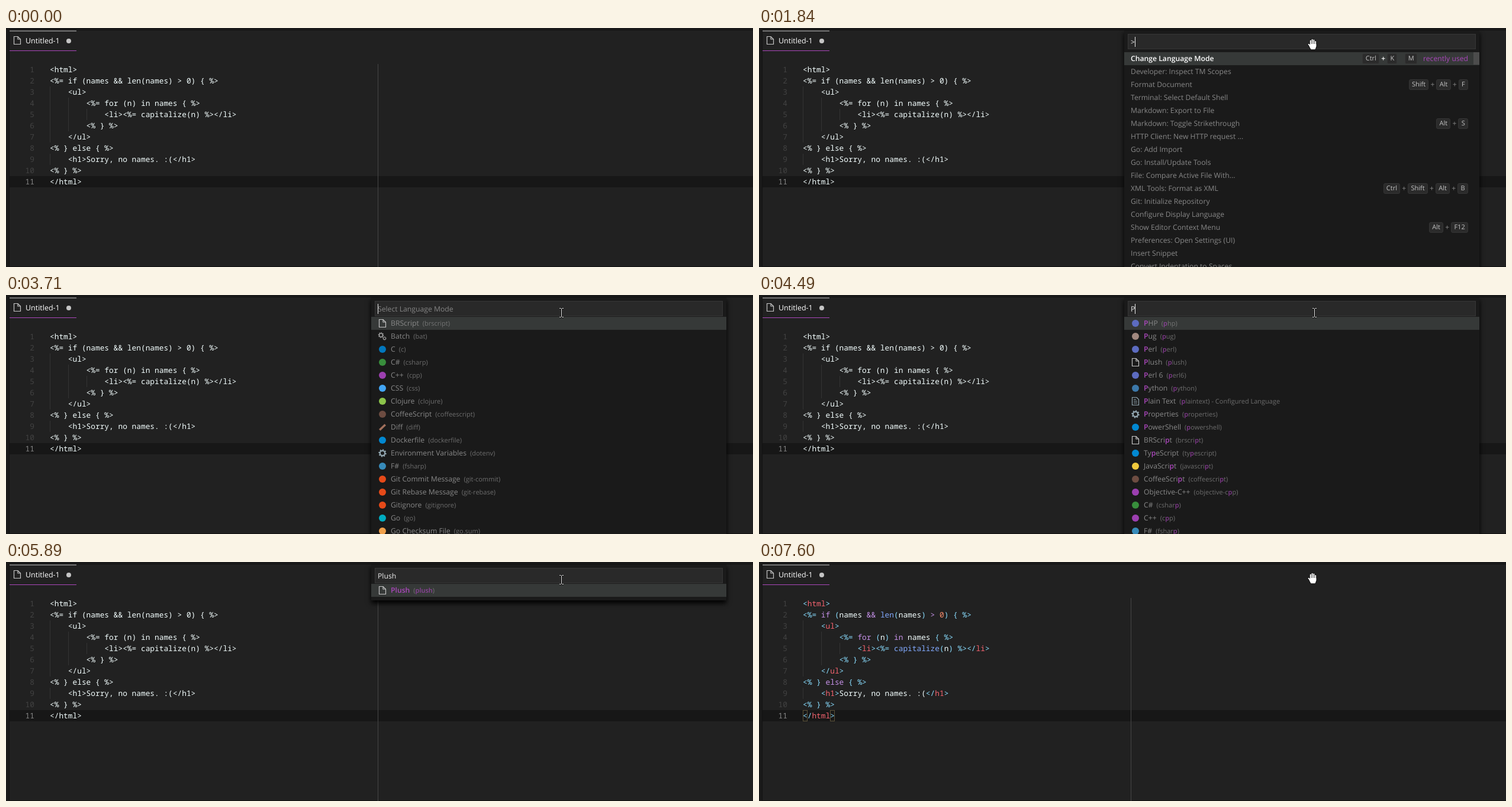
Recreate the animation shown at these times as an HTML page. Size 1262 px wide and 405 px high, loop 8000 ms.

```html
<!DOCTYPE html>
<html lang="en">
<head>
<meta charset="utf-8">
<title>Choosing a language mode</title>
<style>
html, body { margin: 0; width: 100%; height: 100%; overflow: hidden; background: #1a1a1a; }
#stage {
  position: relative; width: 1262px; height: 405px; overflow: hidden; background: #1a1a1a;
  font: 12.2px "Open Sans", "Noto Sans", sans-serif; text-rendering: geometricPrecision; white-space: pre;
}
#stage div, #stage svg { position: absolute; box-sizing: border-box; }
#editor { left: 5px; top: 3px; width: 1257px; height: 402px; background: #212121; border: 1px solid #121212; border-width: 1px 0 1px 1px; }
#tab { left: 6px; top: 4px; width: 113px; height: 35px; border-top: 2px solid #777; border-bottom: 1px solid #ab47bc; }
#title { left: 33px; top: 12px; line-height: 20px; font-size: 12.5px; font-weight: 500; color: #fff; }
#dot { left: 102px; top: 18px; width: 8px; height: 8px; border-radius: 50%; background: #c5c5c5; }
#band { left: 6px; top: 251px; width: 1256px; height: 19px; background: #171717; }
#ruler { left: 628px; top: 61px; width: 1px; height: 344px; background: #474747; }
.guide { width: 1px; background: #333; }
.code { left: 74px; top: 61px; font: 500 12.83px/19px "Noto Sans Mono", "DejaVu Sans Mono", monospace; color: #f4ffff; }
#nums { left: 18px; width: 30px; text-align: right; font-weight: 400; color: #424242; }
#nums b { font-weight: 400; color: #858585; }
.pair { width: 8px; height: 19px; border: 1px solid #5c5238; }
#caret { left: 127px; top: 251px; width: 2px; height: 19px; background: #fc0; }
.op { color: #89ddff; } .tag { color: #f4636f; } .key { color: #c792ea; } .fn { color: #82aaff; } .num { color: #f78c6c; }

#panels { left: 0; top: 0; }
.panel { left: 617px; top: 4px; width: 600px; background: #1a1a1a; box-shadow: 0 5px 8px #000; color: #888; }
.field { left: 6px; top: 6px; width: 588px; height: 26px; padding-left: 4px; line-height: 25px; background: #292929; border: 1px solid #373737; color: #f0f0f0; }
.field i { display: inline-block; width: 1px; height: 17px; margin-right: -1px; vertical-align: -4px; background: #eee; }
.field em { font-style: normal; color: #858585; }
.row { left: 0; width: 600px; height: 22px; line-height: 22px; padding-left: 11px; }
.modes .row { padding-left: 33px; }
.row.on { background: #363938; }
.commands .on { color: #fff; font-weight: 600; }
.row small { font-size: 11px; margin-left: 6px; opacity: .75; }
.row b { font-weight: 600; color: #ab47bc; }
.row svg { left: 11px; top: 3px; }
.keys { right: 19px; top: 0; display: flex; align-items: center; height: 22px; }
.keys kbd { font: 11px/16px "Open Sans", "Noto Sans", sans-serif; padding: 0 4.3px; border: 1px solid #353535; border-radius: 3px; background: #2b2b2b; color: #c4c4c4; }
.keys span { width: 13px; text-align: center; }
.keys u { margin-left: 10px; font-weight: 400; color: #ab47bc; text-decoration: none; }
.bar { right: 0; top: 37px; width: 10px; height: 21px; background: #4c4c4c; }
</style>
</head>
<body>
<div id="stage">
  <div id="editor"></div>
  <div id="tab"></div>
  <svg style="left:11px;top:13px" width="16" height="16" id="file"></svg>
  <div id="title">Untitled-1</div>
  <div id="dot"></div>
  <div id="band"></div>
  <div class="code" id="nums"></div>
  <div class="code" id="plain"></div>
  <div class="code" id="colored"></div>
  <div id="guides"></div>
  <div id="ruler"></div>
  <div id="caret"></div>
  <div id="panels"></div>
  <svg id="hand" style="left:924px;top:16px" width="22" height="23" fill="none" stroke-linecap="round" stroke-linejoin="round">
    <g id="palm"><path d="M7.8 12V5.5M10.6 11V3.8M13.4 11V4.4M16.2 12V7M8 15 4.6 11.8"/><path d="M8 12H16.5V15L15 19.2H9L6.5 14.5Z"/></g>
  </svg>
  <svg id="beam" style="left:933px;top:21px" width="12" height="18" fill="none">
    <path d="M2 1.5H4.5L5.5 2.5 6.5 1.5H9M5.5 2.5V15.5M2 16.5H4.5L5.5 15.5 6.5 16.5H9" stroke="#111" stroke-width="3"/>
    <path d="M2 1.5H4.5L5.5 2.5 6.5 1.5H9M5.5 2.5V15.5M2 16.5H4.5L5.5 15.5 6.5 16.5H9" stroke="#eee"/>
  </svg>
</div>
<script>
const LOOP = 8000;
const $ = id => document.getElementById(id);
const esc = s => s.replace(/&/g, '&amp;').replace(/</g, '&lt;').replace(/>/g, '&gt;');

function add(parent, cls, html = '', css = '') {
  const el = document.createElement('div');
  el.className = cls;
  el.innerHTML = html;
  el.style.cssText = css;
  parent.append(el);
  return el;
}

// Each entry is switched on and off alternately at its times (ms).
const flips = [];
const flip = (el, ...times) => flips.push([el, times]);

// Editor
const lines = `<html>
<%= if (names && len(names) > 0) { %>
    <ul>
        <%= for (n) in names { %>
            <li><%= capitalize(n) %></li>
        <% } %>
    </ul>
<% } else { %>
    <h1>Sorry, no names. :(</h1>
<% } %>
</html>`.split('\n');

const rules = [
  ['', /Sorry.*\(/], ['key', /&&| > |\b(?:if|for|in|else)\b/], ['tag', /(?<=<\/?)\w+/],
  ['fn', /\w+(?=\()/], ['num', /\d+/], ['op', /<%=?|%>|<\/?|[>(){}]/]
];
const anyRule = new RegExp(rules.map(r => `(${r[1].source})`).join('|'), 'g');

function paint(line) {
  let out = '', at = 0;
  for (const m of line.matchAll(anyRule)) {
    const rule = rules[m.slice(1).findIndex(g => g !== undefined)];
    out += esc(line.slice(at, m.index)) + `<span class="${rule[0]}">${esc(m[0])}</span>`;
    at = m.index + m[0].length;
  }
  return out + esc(line.slice(at));
}

$('nums').innerHTML = lines.map((_, i) => i < 10 ? i + 1 : `<b>${i + 1}</b>`).join('\n');
$('plain').textContent = lines.join('\n');
$('colored').innerHTML = lines.map(paint).join('\n');
for (const [x, first, count] of [[0, 3, 5], [0, 9, 1], [31, 4, 3], [62, 5, 1]])
  add($('guides'), 'guide', '', `left:${74 + x}px;top:${42 + first * 19}px;height:${count * 19}px`);
$('guides').style.cssText = 'left:0;top:0';
for (const x of [0, 46]) add($('colored'), 'pair', '', `left:${x}px;top:190px`);

// Icons
const page = '<path d="M2.5 1.5H9L13.5 6V14.5H2.5ZM9 1.5V6H13.5" fill="none" stroke="#c5c5c5" stroke-width="1.2"/>';
const gear = (x, y, r, c) => `<g fill="none" stroke="${c}"><circle cx="${x}" cy="${y}" r="${r}" stroke-width="${r * .55}"/>` +
  `<circle cx="${x}" cy="${y}" r="${r * 1.35}" stroke-width="${r * .5}" pathLength="16" stroke-dasharray="1"/></g>`;
const icons = {
  page,
  text: '<path d="M2.5 1.5H10L13.5 5V14.5H2.5ZM5 5H9M5 8H11M5 11H11" fill="none" stroke="#90a4ae" stroke-width="1.2"/>',
  gears: gear(5.5, 6, 3, '#9a9a9a') + gear(11.5, 11.5, 2, '#9a9a9a'),
  gear: gear(8, 8, 4.2, '#90a4ae'),
  diff: '<path d="M2 11.5 11.5 2.5 14 5 4.5 14Z" fill="#a1705c"/>'
};
const dot = c => `<circle cx="8" cy="8" r="6" fill="${c}"/>`;
const svg = name => `<svg width="16" height="16">${icons[name] || dot(name)}</svg>`;
$('file').innerHTML = page;

// Quick pick panels
const commands = `Change Language Mode|Ctrl+K M
Developer: Inspect TM Scopes
Format Document|Shift+Alt+F
Terminal: Select Default Shell
Markdown: Export to File
Markdown: Toggle Strikethrough|Alt+S
HTTP Client: New HTTP request ...
Go: Add Import
Go: Install/Update Tools
File: Compare Active File With...
XML Tools: Format as XML|Ctrl+Shift+Alt+B
Git: Initialize Repository
Configure Display Language
Show Editor Context Menu|Alt+F12
Preferences: Open Settings (UI)
Insert Snippet
Convert Indentation to Spaces`.split('\n');

const modes = `BRScript|brscript|page
Batch|bat|gears
C|c|#0277bd
C#|csharp|#388e3c
C++|cpp|#9c3fb0
CSS|css|#42a5f5
Clojure|clojure|#8bc34a
CoffeeScript|coffeescript|#6d4c41
Diff|diff|diff
Dockerfile|dockerfile|#0288d1
Environment Variables|dotenv|gear
F#|fsharp|#378bba
Git Commit Message|git-commit|#e64a19
Git Rebase Message|git-rebase|#e64a19
Gitignore|gitignore|#e64a19
Go|go|#00acc1
Go Checksum File|go.sum|#f0a04b`.split('\n');

const plush = 'Plush|plush|page', plainText = 'Plain Text|plaintext|text|Configured Language';
const matchP = ['PHP|php|#5c6bc0', 'Pug|pug|#a1887f', 'Perl|perl|#5c6bc0', plush, 'Perl 6|perl6|#5c6bc0',
  'Python|python|#3c78aa', plainText, 'Properties|properties|gear', 'PowerShell|powershell|#0288d1',
  modes[0], 'TypeScript|typescript|#0288d1', 'JavaScript|javascript|#f0c93d', modes[7],
  'Objective-C++|objective-cpp|#9c3fb0', modes[3], modes[4], modes[11]];

function panel(cls, typed, hint, height, from, to, ...blink) {
  const el = add($('panels'), 'panel ' + cls, '', `height:${height}px`);
  const field = add(el, 'field', `${esc(typed)}<i></i><em>${hint}</em>`);
  flip(el, from, to);
  flip(field.querySelector('i'), from, ...blink);
  return el;
}

const rowAt = (el, top, i, html) => add(el, i ? 'row' : 'row on', html, `top:${top + i * 22}px`);

function keys(combo, recent) {
  const chords = combo.split(' ').map(c => c.split('+').map(k => `<kbd>${k}</kbd>`).join('<span>+</span>'));
  return `<div class="keys">${chords.join('<span></span>')}${recent ? '<u>recently used</u>' : ''}</div>`;
}

function modePanel(typed, list, from, to, ...blink) {
  const height = list.length > 2 ? 420 : 39 + list.length * 22;
  const el = panel('modes', typed, typed ? '' : 'Select Language Mode', height, from, to, ...blink);
  const mark = s => typed ? s.replace(new RegExp(typed, 'i'), '<b>$&</b>') : s;
  list.forEach((item, i) => {
    const [label, id, icon, note] = item.split('|');
    rowAt(el, 33, i, `${svg(icon)}${mark(label)}<small>(${mark(id)})${note ? ' - ' + note : ''}</small>`);
  });
}

const palette = panel('commands', '>', '', 420, 1840, 3710, 2310, 2780, 3330);
commands.forEach((item, i) => {
  const [label, combo] = item.split('|');
  rowAt(palette, 37, i, label + (combo ? keys(combo, !i) : ''));
});
add(palette, 'bar');

modePanel('', modes, 3710, 4490, 4260);
modePanel('P', matchP, 4490, 4810);
modePanel('Pl', [plush, plainText], 4810, 5130);
modePanel('Plu', [plush], 5130, 5280);
modePanel('Plus', [plush], 5280, 5360);
modePanel('Plush', [plush], 5360, 6060, 5890);

// Pointer: dark outline below the white shape
const palm = $('palm'), edge = palm.cloneNode(true);
edge.removeAttribute('id');
palm.before(edge);
edge.setAttribute('style', 'stroke:#111;stroke-width:4');
palm.setAttribute('style', 'stroke:#fff;stroke-width:2;fill:#fff');

flip($('caret'), 530, 980, 1440, 1840, 6060, 6610, 7070, 7600);
flip($('hand'), 670, 1910, 6130);
flip($('beam'), 1910, 6130);
flip($('plain'), 0, 6130);
flip($('colored'), 6130);

function render(now) {
  const t = now % LOOP;
  for (const [el, times] of flips) el.style.opacity = times.filter(x => x <= t).length % 2;
  $('hand').style.transform = t >= 670 && t < 750 ? 'translateX(12px)' : '';
  requestAnimationFrame(render);
}
render(performance.now());
</script>
</body>
</html>
```
